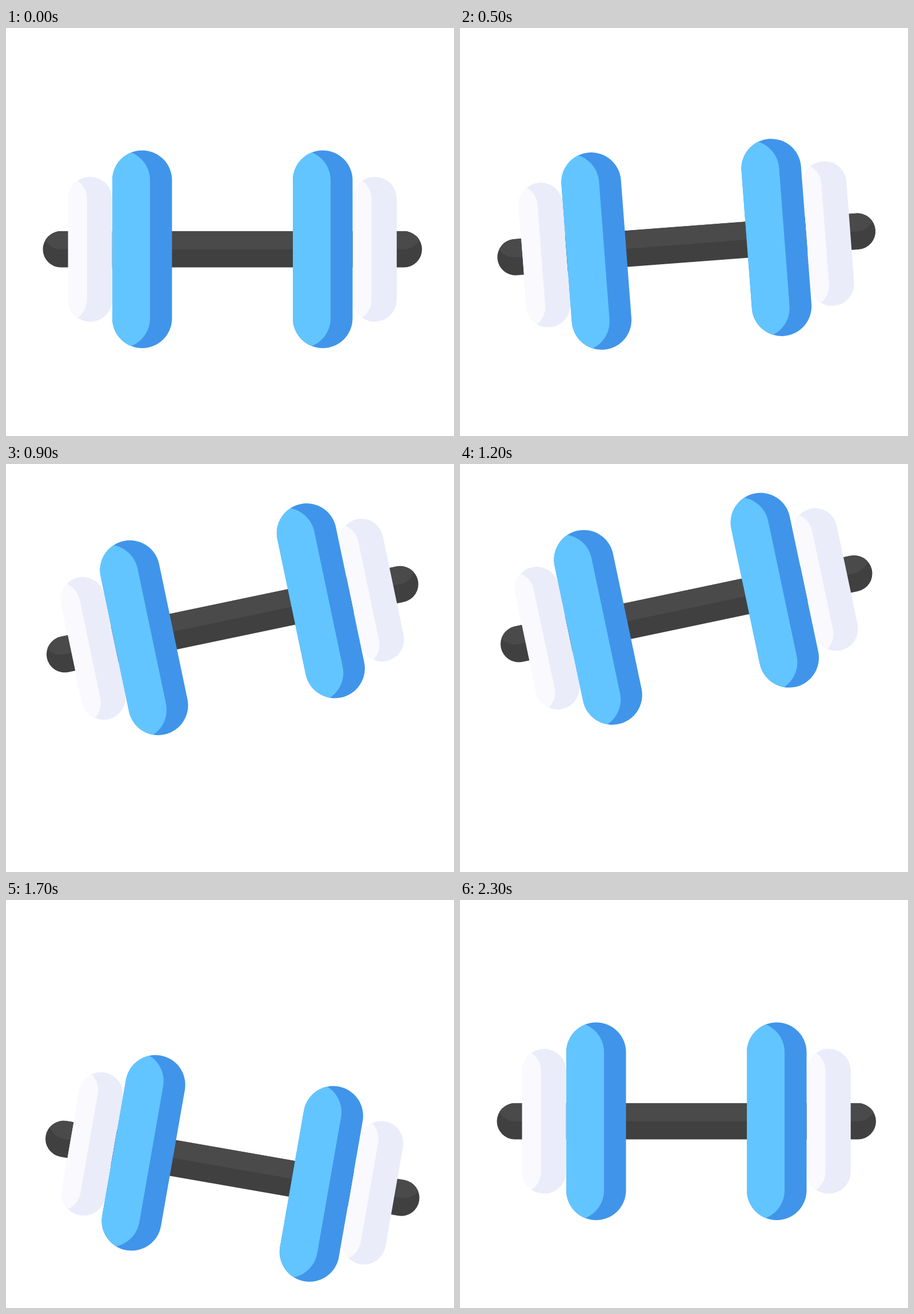
Animation, 784 px wide and 715 px high, one loop 2700 ms. Source, as an HTML page with a canvas:

```html
<!DOCTYPE html>
<html lang="en">
<head>
<meta charset="utf-8">
<title>Dumbbell</title>
<style>
  html, body { margin: 0; width: 100%; height: 100%; overflow: hidden; background: #fff; }
  canvas { display: block; }
</style>
</head>
<body>
<canvas id="stage" width="784" height="715"></canvas>
<script>
const ctx = document.getElementById("stage").getContext("2d");
const LOOP = 2700, STEP = 100, CENTER_X = 396.25;

// [time in ms, centre y, tilt in degrees]
const KEYS = [
  [0, 387.8, 0], [100, 387.8, 0], [300, 427, 0], [500, 379, -4.33],
  [700, 332.5, -7.67], [900, 272.1, -11.83], [1100, 218.5, -15.6],
  [1300, 289, -8.2], [1400, 325.6, -4.25], [1700, 470.3, 9.92],
  [1900, 387.8, -8], [2300, 387.8, 0], [LOOP, 387.8, 0]
];

function poseAt(time) {
  const i = KEYS.findIndex(key => key[0] > time);
  const [t0, y0, a0] = KEYS[i - 1], [t1, y1, a1] = KEYS[i];
  const u = (time - t0) / (t1 - t0);
  return { y: y0 + (y1 - y0) * u, tilt: a0 + (a1 - a0) * u };
}

function capsule(x, y, w, h) {
  ctx.beginPath();
  ctx.roundRect(x - w / 2, y - h / 2, w, h, Math.min(w, h) / 2);
}

// A capsule whose highlight is a shifted copy of itself, cut to its outline.
function shaded(x, w, h, dark, light, dx, dy) {
  ctx.save();
  capsule(x, 0, w, h);
  ctx.fillStyle = dark;
  ctx.fill();
  ctx.clip();
  capsule(x + dx, dy, w, h);
  ctx.fillStyle = light;
  ctx.fill();
  ctx.restore();
}

function draw() {
  const time = Math.floor(performance.now() % LOOP / STEP) * STEP;
  const { y, tilt } = poseAt(time);
  ctx.clearRect(0, 0, 784, 715);
  ctx.save();
  ctx.translate(CENTER_X, y);
  ctx.rotate(tilt * Math.PI / 180);
  shaded(0, 663.5, 63.5, "#404040", "#4a4a4a", 0, -31.75);
  for (const side of [-1, 1]) {
    shaded(side * 249, 77, 254, "#eaecfa", "#f9f9fe", -44, 0);
    shaded(side * 158, 104.5, 346.5, "#4095ea", "#62c5ff", -38.5, 0);
  }
  ctx.restore();
  requestAnimationFrame(draw);
}
draw();
</script>
</body>
</html>
```
